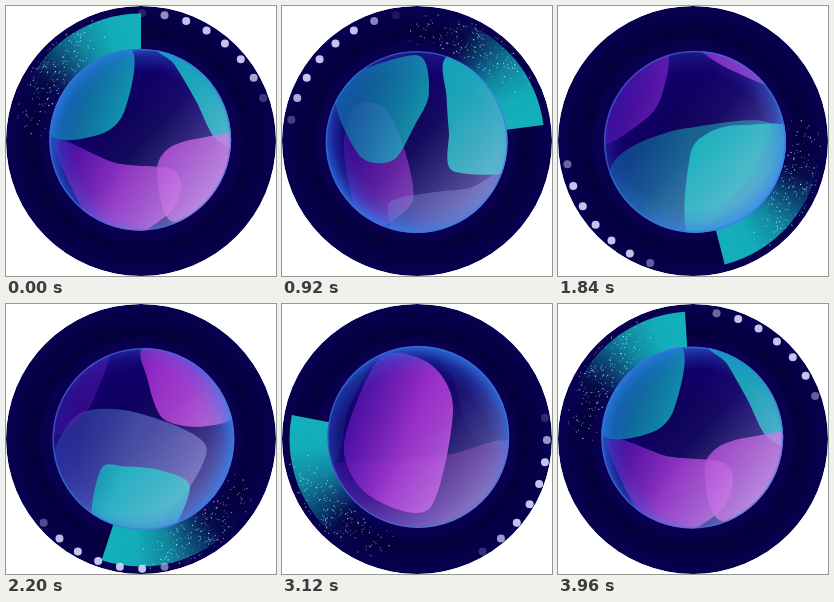
Animation, 270 px wide and 270 px high, one loop 4 s. Source, as an HTML page with a canvas:

```html
<!DOCTYPE html>
<html lang="en">
<head>
<meta charset="utf-8">
<title>Orb</title>
<style>
html, body { margin: 0; width: 100%; height: 100%; overflow: hidden; background: #fff; }
canvas { display: block; width: 100vmin; height: 100vmin; }
</style>
</head>
<body>
<canvas></canvas>
<script>
const SIZE = 270, LOOP = 4000, STEP = 40, TAU = Math.PI * 2;
const RAD = Math.PI / 180;
const canvas = document.querySelector('canvas');
const ctx = canvas.getContext('2d');
const TEAL = [20, 184, 192], PURPLE = [176, 52, 218];
const KEY_TIMES = [0, 480, 1320, 1840, 2560, 3120, LOOP];

// Each pose: outline | tint (0 teal, 1 purple) and opacity
const parsePose = text => {
  const [outline, look] = text.split('|');
  return [...outline.trim().split(/[ ,]+/), ...look.trim().split(' ')].map(Number);
};
const petals = [
  [ // lower left
    '48,136 110,157 165,163 175,182 160,210 100,235 | 1 .78',
    '76,150 88,113 115,108 134,140 135,226 75,220 | 1 .9',
    '50,150 55,90 90,95 110,140 125,170 90,225 | 1 .2',
    '52,165 75,140 130,122 215,122 135,235 60,215 | 0 .5',
    '42,150 70,80 130,95 186,165 170,197 95,197 | 1 .72',
    '62,140 98,54 148,60 171,105 147,205 85,190 | 1 .85'
  ],
  [ // upper left
    '48,132 95,128 118,106 127,46 80,25 25,90 | 0 .9',
    '43,148 68,148 80,120 105,102 140,35 30,60 | 0 .65',
    '108,150 150,160 180,120 185,75 130,62 76,100 | 0 .85',
    '40,139 90,111 105,85 110,48 85,20 20,80 | 1 .75',
    '48,125 65,110 75,95 95,50 75,30 25,80 | 1 .1',
    '48,160 60,140 65,110 90,50 70,30 25,90 | 0 .15'
  ],
  [ // upper right
    '152,42 168,58 190,95 210,133 240,138 210,30 | 0 .9',
    '143,42 152,70 180,88 228,96 245,80 190,20 | 0 .9',
    '183,60 176,110 155,160 120,228 245,225 245,65 | 0 .85',
    '143,42 160,57 180,67 212,78 220,45 170,25 | 1 .7',
    '132,42 122,90 134,162 183,167 245,165 220,20 | 1 .95',
    '152,45 172,75 182,115 200,140 245,135 215,25 | 0 .05'
  ],
  [ // lower right
    '151,165 163,142 195,132 240,132 225,200 165,215 | 1 .8',
    '92,198 135,190 185,178 228,152 225,220 120,240 | 1 .7',
    '120,198 165,183 195,184 235,168 220,230 130,240 | 0 .15',
    '132,150 152,126 185,119 240,128 220,235 133,235 | 0 .9',
    '58,180 85,199 122,213 128,238 90,240 45,210 | 0 .9',
    '50,163 110,158 170,150 232,140 220,235 80,235 | 1 .3'
  ]
].map(poses => poses.map(parsePose));

let seed = 17;
const random = () => (seed = seed * 16807 % 2147483647) / 2147483647;
const sparks = Array.from({ length: 180 }, () => ({
  angle: -52 + (random() + random() - 1) * 36,
  radius: 95 + random() * 36,
  size: .6 + random() * .6,
  alpha: .35 + random() * .65
}));

const rgba = (color, alpha) => `rgba(${color.map(Math.round)},${alpha})`;
const mix = (a, b, k) => a.map((value, i) => value + (b[i] - value) * k);

// Angles run clockwise from the top
const polar = (angle, radius, cx = 135, cy = 135) =>
  [cx + Math.sin(angle * RAD) * radius, cy - Math.cos(angle * RAD) * radius];

function withStops(gradient, stops) {
  stops.forEach(([at, color]) => gradient.addColorStop(at, color));
  return gradient;
}

function disc(x, y, radius, fill) {
  ctx.fillStyle = fill;
  ctx.beginPath();
  ctx.arc(x, y, radius, 0, TAU);
  ctx.fill();
}

function drawBackground() {
  disc(135, 135, 135, withStops(ctx.createRadialGradient(135, 135, 80, 135, 135, 135), [
    [0, '#080052'], [.3, '#09004f'], [.48, '#04003a'], [.68, '#060044'], [1, '#080050']
  ]));
}

function drawRing(lead) {
  const start = (lead - 160) * RAD, sweep = 70;
  const clear = rgba(TEAL, 0);
  ctx.fillStyle = withStops(ctx.createConicGradient(start, 135, 135), [
    [0, clear], [12 / 360, rgba(TEAL, .06)], [38 / 360, rgba(TEAL, .72)],
    [55 / 360, rgba(TEAL, .94)], [.21, rgba(TEAL, .96)], [.22, clear], [1, clear]
  ]);
  ctx.beginPath();
  ctx.arc(135, 135, 127.5, start, start + sweep * RAD);
  ctx.arc(135, 135, 88, start + sweep * RAD, start, true);
  ctx.fill();
  for (const { angle, radius, size, alpha } of sparks) {
    const [x, y] = polar(lead + angle, radius);
    ctx.fillStyle = `rgba(190,240,255,${alpha})`;
    ctx.fillRect(x - size / 2, y - size / 2, size, size);
  }
}

function drawDots(turn) {
  for (let angle = 0; angle < 360; angle += 10) {
    const gap = Math.abs(((angle - 36 + turn + 540) % 360) - 180);
    const alpha = Math.max(0, Math.min(1, (39 - gap) / 18));
    if (!alpha) continue;
    const [x, y] = polar(angle, 128.7, 136.2, 136);
    disc(x, y, 4, `rgba(215,218,255,${alpha * .9})`);
  }
}

function poseAt(poses, time) {
  let i = 0;
  while (time >= KEY_TIMES[i + 1]) i++;
  const k = (time - KEY_TIMES[i]) / (KEY_TIMES[i + 1] - KEY_TIMES[i]);
  return mix(poses[i], poses[(i + 1) % poses.length], k);
}

function drawPetal(pose) {
  const points = Array.from({ length: 6 }, (_, i) => pose.slice(2 * i, 2 * i + 2));
  const [tint, alpha] = pose.slice(12);
  const at = i => points[(i + 6) % 6];
  const color = mix(TEAL, PURPLE, tint);
  const deep = mix([12, 110, 165], [65, 12, 170], tint);
  ctx.fillStyle = withStops(ctx.createLinearGradient(48, 105, 210, 160), [
    [0, rgba(deep, alpha * .85)], [.5, rgba(color, alpha)],
    [1, rgba(mix(color, [235, 120, 235], tint * .5), alpha)]
  ]);
  ctx.beginPath();
  ctx.moveTo(...at(0));
  for (let i = 0; i < 6; i++) {
    const [a, b, c, d] = [at(i - 1), at(i), at(i + 1), at(i + 2)];
    ctx.bezierCurveTo(
      b[0] + (c[0] - a[0]) / 7, b[1] + (c[1] - a[1]) / 7,
      c[0] - (d[0] - b[0]) / 7, c[1] - (d[1] - b[1]) / 7, c[0], c[1]);
  }
  ctx.fill();
}

function drawOrb(time, turn) {
  const [cx, cy] = polar(-60 - turn, 1.8, 135.7, 134.6);
  const radius = 91;
  ctx.save();
  ctx.beginPath();
  ctx.arc(cx, cy, radius, 0, TAU);
  ctx.clip();
  disc(cx, cy, radius, withStops(ctx.createRadialGradient(cx, cy, 20, cx, cy, radius), [
    [0, '#0c0058'], [.7, '#12006a'], [1, '#1c1488']
  ]));
  petals.forEach(poses => drawPetal(poseAt(poses, time)));

  // Fixed sheen from the lower right
  disc(cx, cy, radius, withStops(ctx.createLinearGradient(112, 108, 205, 192), [
    [0, 'rgba(190,205,235,0)'], [.3, 'rgba(190,205,235,.05)'],
    [.65, 'rgba(195,205,235,.25)'], [1, 'rgba(205,215,240,.46)']
  ]));

  // Blue inner glow that turns around the rim
  const [gx, gy] = polar(-60 - turn, -13, cx, cy);
  disc(cx, cy, radius, withStops(ctx.createRadialGradient(gx, gy, 76, gx, gy, 104), [
    [0, 'rgba(35,110,225,0)'], [.5, 'rgba(35,110,225,.22)'], [1, 'rgba(45,130,240,.75)']
  ]));
  ctx.restore();
  ctx.strokeStyle = 'rgba(65,115,220,.6)';
  ctx.lineWidth = 1.5;
  ctx.beginPath();
  ctx.arc(cx, cy, radius - .7, 0, TAU);
  ctx.stroke();
}

function draw(now) {
  const time = Math.floor(now % LOOP / STEP) * STEP;
  const turn = time / LOOP * 360;
  const pixels = Math.round(Math.min(innerWidth, innerHeight) * devicePixelRatio) || SIZE;
  if (canvas.width !== pixels) canvas.width = canvas.height = pixels;
  ctx.setTransform(pixels / SIZE, 0, 0, pixels / SIZE, 0, 0);
  ctx.clearRect(0, 0, SIZE, SIZE);
  ctx.save();
  ctx.beginPath();
  ctx.arc(135, 135, 135, 0, TAU);
  ctx.clip();
  drawBackground();
  drawRing(turn);
  drawDots(turn);
  drawOrb(time, turn);
  ctx.restore();
}

const begin = performance.now();
function tick() {
  draw(performance.now() - begin);
  requestAnimationFrame(tick);
}
tick();
</script>
</body>
</html>
```
